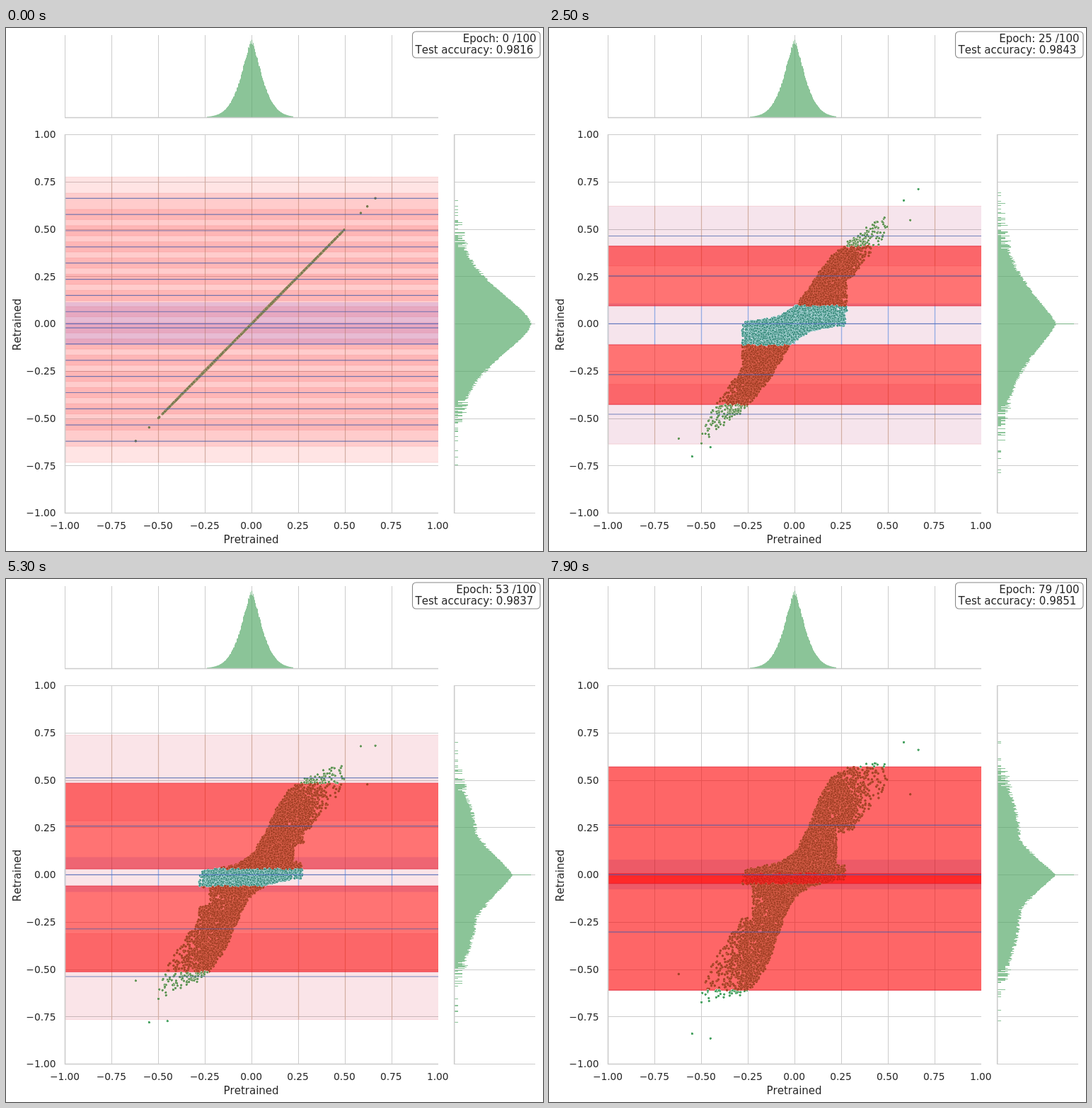
An HTML page with a canvas for the animation above (8 s loop, 759 by 738 pixels).

```html
<!DOCTYPE html>
<html lang="en">
<head>
<meta charset="utf-8">
<title>Weight clustering</title>
<style>
  html, body { margin: 0; width: 100%; height: 100%; overflow: hidden; background: #fff; }
  canvas { display: block; width: 759px; height: 738px; }
</style>
</head>
<body>
<canvas id="stage" width="759" height="738"></canvas>
<script>
const ctx = document.getElementById('stage').getContext('2d');
const FONT = '"DejaVu Sans", Verdana, sans-serif';
const LEFT = 83, RIGHT = 611, TOP = 150.5, BOTTOM = 684.5, ZERO = 417;
const STEPS = 80, STEP_MS = 100;
const GREEN = 'rgba(85,168,104,.68)';

const px = x => 347 + x * 264;
const py = y => ZERO + 0.3 - y * 267;
const lerp = (a, b, t) => a + (b - a) * t;
const fract = v => v - Math.floor(v);
const hash = (a, b = 0) => fract(Math.sin(a * 12.9898 + b * 78.233) * 43758.5453);
const bell = (d, width, power) => Math.exp(-Math.pow(Math.abs(d) / width, power));

function random(seed) {
  return () => (seed = (seed * 16807) % 2147483647) / 2147483647;
}

// Reported accuracy by epoch; the rest is interpolated
const ACCURACY = [[0, 0.9816], [9, 0.9822], [25, 0.9843], [35, 0.9829], [46, 0.9840], [60, 0.9834], [79, 0.9851]];

function accuracy(epoch) {
  const i = Math.max(1, ACCURACY.findIndex(p => p[0] >= epoch));
  const [e1, a1] = ACCURACY[i - 1], [e2, a2] = ACCURACY[i];
  return lerp(a1, a2, (epoch - e1) / (e2 - e1));
}

function state(epoch) {
  const half = 30 + 0.4 * epoch + 0.0033 * epoch * epoch;
  const upper = 351 - 0.045 * epoch;
  const lower = 485 + 0.165 * epoch;
  return {
    epoch, half,
    reds: [upper, lower],
    // Outer clusters finally merge into the red ones
    outer: [
      epoch < 55 ? 305 - 0.46 * epoch : upper,
      epoch < 70 ? Math.min(561, 525 + 0.8 * epoch) : lower
    ],
    gap: [upper + half, lower - half],
    core: 32 - 0.14 * epoch,
    spread: Math.min(1, Math.pow(epoch / 9, 0.6)),
    late: Math.pow(Math.max(0, epoch - 9) / 70, 0.7)
  };
}

function makeCloud() {
  const rnd = random(421), cloud = [];
  const add = (x, q) => cloud.push({ x, q, noise: (rnd() + rnd() - 1) * 0.025 });
  for (let i = 0; i < 6600; i++) {
    add((rnd() * 2 - 1) * (0.25 + 0.025 * rnd()), rnd());
  }
  for (let i = 0; i < 1100; i++) {
    const x = 0.25 - 0.065 * Math.log(1 - 0.98 * rnd());
    add(i % 2 ? x : -x, rnd());
  }
  return cloud;
}
const cloud = makeCloud();

// Far points: x, early y, late y
const FAR = [
  [0.663, 0.74, 0.66], [0.62, 0.615, 0.425], [0.585, 0.625, 0.7],
  [-0.62, -0.652, -0.525], [-0.548, -0.625, -0.84], [-0.45, -0.535, -0.865]
];

// Upper outline of the point cloud
function edge(x, late) {
  if (x < -0.28) return 1.2 * x + 0.1 + 0.02 * late;
  const early = 0.06 * Math.log(1 + Math.exp((x + 0.04) / 0.058)) + 0.02 * (x + 0.28);
  const lobe = 0.02 + 0.44 / (1 + Math.exp((0.1 - x) / 0.045)) + 0.18 * (x + 0.28);
  return lerp(early, lobe, late);
}

function makeDot(fill, rim) {
  const c = document.createElement('canvas');
  c.width = c.height = 20;
  const g = c.getContext('2d');
  g.beginPath();
  g.arc(10, 10, 7.2, 0, 7);
  g.fillStyle = fill;
  g.fill();
  g.strokeStyle = rim;
  g.lineWidth = 2;
  g.stroke();
  return c;
}
const DOTS = {
  plain: makeDot('rgb(72,162,98)', 'rgba(255,255,255,.7)'),
  pink: makeDot('rgb(98,150,88)', 'rgba(250,232,232,.7)'),
  teal: makeDot('rgb(70,148,134)', 'rgba(185,222,226,.75)'),
  red: makeDot('rgb(166,66,40)', 'rgba(226,100,82,.75)'),
  deep: makeDot('rgb(212,32,24)', 'rgba(245,50,45,.75)'),
  olive: makeDot('rgb(118,122,78)', 'rgba(200,165,140,.6)')
};

function line(x1, y1, x2, y2, color, width = 1) {
  ctx.strokeStyle = color;
  ctx.lineWidth = width;
  ctx.beginPath();
  ctx.moveTo(x1, y1);
  ctx.lineTo(x2, y2);
  ctx.stroke();
}
const row = (y, color, width) => line(LEFT, y, RIGHT, y, color, width);

function text(s, x, y, size, align) {
  ctx.font = size + 'px ' + FONT;
  ctx.fontKerning = 'none';
  ctx.textAlign = align;
  ctx.fillStyle = '#262626';
  ctx.fillText(s, x, y);
}

function columns(y1, y2, color, width) {
  for (let i = 0; i < 8; i++) {
    const x = Math.round(83 + i * 66) + 0.5;
    line(x, y1, x, y2, color, width);
  }
}

function grid() {
  columns(10, 126, '#ccc');
  columns(TOP, BOTTOM, '#ccc');
  for (let i = 0; i < 9; i++) {
    const y = Math.round(150 + i * 66.75) + 0.5;
    row(y, '#ccc');
    line(634, y, 748, y, '#ccc');
  }
}

function axes() {
  row(126.5, '#ccc', 1.6);
  row(BOTTOM, '#ccc', 1.6);
  line(83.5, TOP - 0.5, 83.5, BOTTOM + 0.5, '#ccc', 1.6);
  line(633.7, TOP - 0.5, 633.7, BOTTOM + 0.5, '#ccc', 1.6);
  for (let i = 0; i < 9; i++) {
    const v = -1 + i * 0.25;
    const label = (v < 0 ? '\u2212' : '') + Math.abs(v).toFixed(2);
    text(label, 83 + i * 65.9, 707, 13.75, 'center');
    text(label, 70.5, Math.round(689.3 - i * 66.75), 13.75, 'right');
  }
  text('Pretrained', 346.5, 727, 15, 'center');
  ctx.save();
  ctx.translate(21, 418.5);
  ctx.rotate(-Math.PI / 2);
  text('Retrained', 0, 0, 15, 'center');
  ctx.restore();
}

function topHistogram() {
  ctx.fillStyle = GREEN;
  for (let x = 284; x < 406; x++) {
    const h = 107 * bell(x + 0.5 - 347, 21, 1.45) * (1 + (hash(x, 3) - 0.5) * 0.07);
    ctx.fillRect(x, 126 - h, 1, h);
  }
}

function barLength(y, { epoch, late }) {
  const d = (y - ZERO) / (y > ZERO ? 1.03 : 1);
  const peak = epoch
    ? 82 * bell(d, lerp(84, 51, late), lerp(1.45, 1.23, late))
    : 108 * bell(d, 69, 1.6);
  const shoulder = 32 * bell(d, lerp(105, 132, late), 4);
  const tail = 2.6 * bell(d, lerp(130, 180, late), 6);
  const w = Math.max(peak, shoulder, tail);
  const r = hash(y, epoch + 1);
  if (w > 15) return w + (r - 0.5) * (w < 50 ? 5.5 : 2);
  if (r > w / 13) return 0;
  // Low counts on a log scale
  const count = 1 + Math.floor(hash(y + 0.5, epoch) * w / 2.8);
  return 5 + 9 * Math.log2(count) / 1.5;
}

function sideHistogram(s) {
  ctx.fillStyle = GREEN;
  for (let y = 225; y < 645; y++) {
    ctx.fillRect(634, y, y === ZERO ? 108 : barLength(y, s), 1);
  }
}

function band(y1, y2, color) {
  ctx.fillStyle = color;
  ctx.fillRect(LEFT, y1, RIGHT - LEFT, y2 - y1);
}

function multiplyBand(y1, y2, color) {
  if (y2 <= y1) return;
  ctx.globalCompositeOperation = 'multiply';
  band(y1, y2, color);
  ctx.globalCompositeOperation = 'source-over';
}

function edges(c, half, color, width) {
  row(c - half, color, width);
  row(c + half, color, width);
}

const EVEN = Array.from({ length: 16 }, (_, i) => 240.3 + i * 22.85);

function startBands() {
  for (const c of EVEN) {
    band(c - 30, c + 30, 'rgba(255,0,0,.105)');
    edges(c, 30, 'rgba(200,60,60,.13)');
  }
  band(387, 447, 'rgba(70,70,255,.13)');
  columns(210, 613, 'rgba(205,150,120,.35)', 1.3);
}

function bands({ epoch, half, outer, reds, gap, core }) {
  const t = epoch / 79;
  const pink = `rgb(${lerp(242, 254, t)},228,${lerp(239, 229, t)})`;
  for (const c of outer) {
    multiplyBand(c - half, c + half, pink);
    if (!reds.includes(c)) columns(c - half, c + half, 'rgba(220,165,135,.45)', 1.4);
    edges(c, half, 'rgba(230,120,130,.25)');
  }
  const [g1, g2] = gap;
  if (g2 > g1) {
    multiplyBand(g1, g2, pink);
    columns(g1, g2, 'rgba(130,170,245,.65)', 1.5);
  }
  for (const c of reds) band(c - half, c + half, 'rgba(255,0,0,.55)');
  const shade = 'rgb(238,224,255)';
  multiplyBand(ZERO - core, Math.min(g1, g2), shade);
  multiplyBand(Math.max(g1, g2), ZERO + core, shade);
  for (const c of reds) edges(c, half, 'rgba(225,20,40,.5)', 1.4);
}

function dotFor(y, s) {
  if (s.epoch === 0) return DOTS.olive;
  const near = c => Math.abs(y - c) < s.half;
  const hits = s.reds.filter(near).length;
  if (hits) return hits > 1 ? DOTS.deep : DOTS.red;
  if (y > s.gap[0] && y < s.gap[1]) return DOTS.teal;
  return s.outer.some(near) ? DOTS.pink : DOTS.plain;
}

function points(s) {
  const { late, spread } = s;
  const put = (x, y) => {
    const Y = py(lerp(x, y, spread));
    ctx.drawImage(dotFor(Y, s), px(x) - 2.5, Y - 2.5, 5, 5);
  };
  for (const { x, q, noise } of cloud) {
    let y = lerp(-edge(-x, late), edge(x, late), q);
    if (y < -0.12) y *= 1.04 + 0.07 * late;
    const ax = Math.abs(x), ay = Math.abs(y);
    // Opening between the pulled-in and pushed-out points
    const open = ax > 0.225 && ay > 0.09 - 0.04 * late && ay < 0.24 * late;
    if (late > 0.25 && open) continue;
    put(x, y + noise * Math.min(1, ay * 6));
  }
  for (const [x, a, b] of FAR) put(x, lerp(a, b, late));
}

function centers({ epoch, outer, reds }) {
  const list = epoch ? new Set([...outer, ...reds]) : EVEN;
  for (const c of list) row(c, 'rgba(60,90,170,.7)', 1.2);
  row(417.3, 'rgba(70,100,190,.75)', 1.3);
}

function legend(epoch) {
  ctx.beginPath();
  ctx.roundRect(574.5, 5, 180.5, 37, 5);
  ctx.fillStyle = '#fff';
  ctx.fill();
  ctx.strokeStyle = '#888';
  ctx.lineWidth = 1.1;
  ctx.stroke();
  text(`Epoch: ${epoch} /100`, 749.5, 20, 15, 'right');
  text(`Test accuracy: ${accuracy(epoch).toFixed(4)}`, 578.5, 35.5, 15, 'left');
}

function draw(epoch) {
  const s = state(epoch);
  ctx.fillStyle = '#fff';
  ctx.fillRect(0, 0, 759, 738);
  grid();
  topHistogram();
  sideHistogram(s);
  if (epoch) bands(s);
  else startBands();
  points(s);
  centers(s);
  axes();
  legend(epoch);
}

let shown = -1;
const start = performance.now();
function tick() {
  const epoch = Math.floor((performance.now() - start) / STEP_MS) % STEPS;
  if (epoch !== shown) draw(shown = epoch);
  requestAnimationFrame(tick);
}
tick();
</script>
</body>
</html>
```
